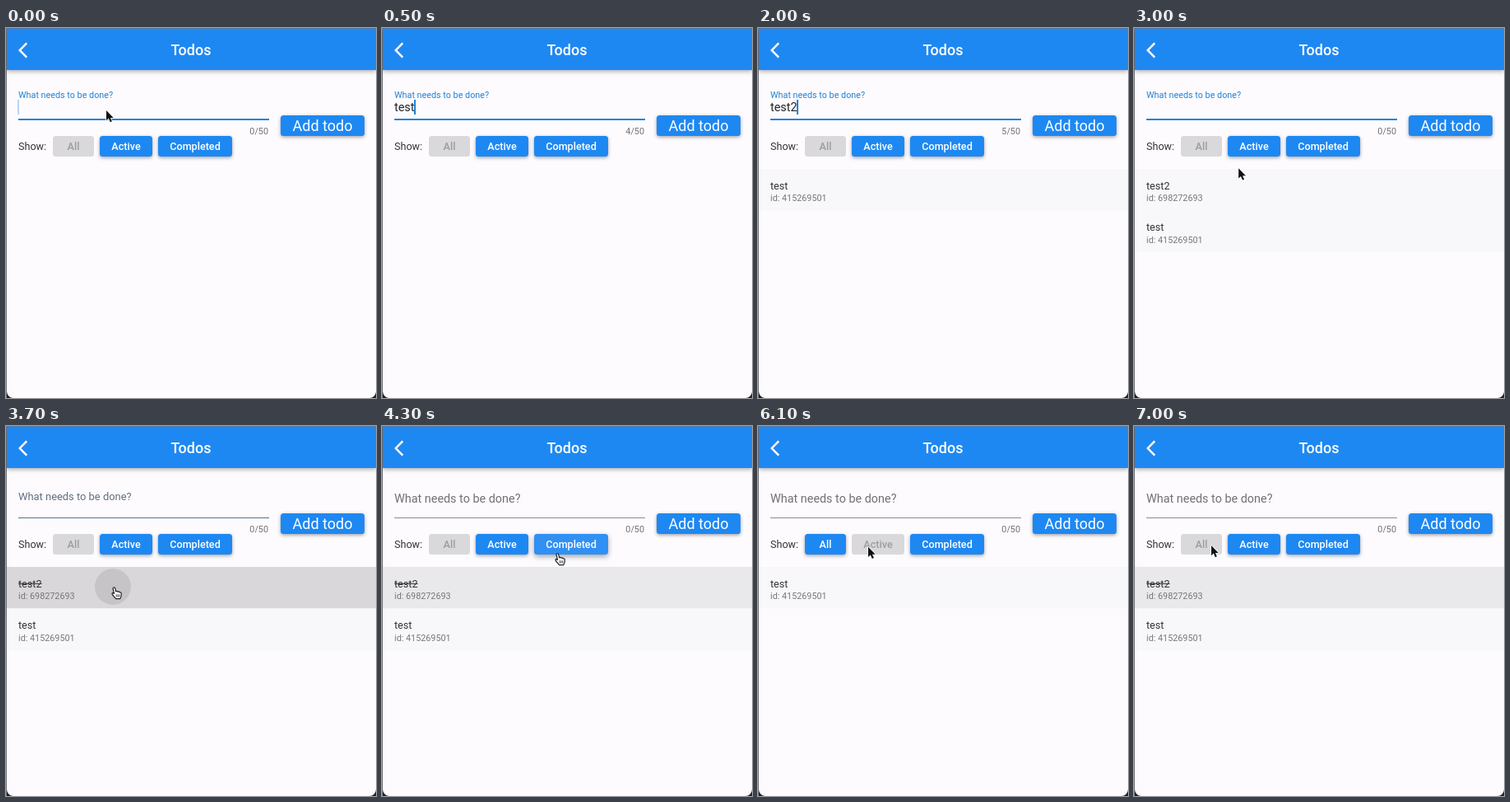
An HTML page with a canvas that plays this animation: 450x449 px, repeating every 7.1 s.

```html
<!DOCTYPE html>
<html lang="en">
<head>
<meta charset="utf-8">
<title>Todos</title>
<style>
html, body { margin: 0; width: 100%; height: 100%; overflow: hidden; background: #111; }
canvas { display: block; width: 450px; height: 449px; }
</style>
</head>
<body>
<canvas id="stage" width="450" height="449"></canvas>
<script>
const ctx = document.getElementById('stage').getContext('2d');
const LOOP = 7100, STEP = 100;
const BLUE = '#1e88f2', PAPER = '#fdfbfe';

const ARROW = new Path2D('M0 0V12.2L2.8 9.6L4.8 14.2L6.9 13.3L4.9 8.9H8.7Z');
const HAND = new Path2D('M1 2Q2.3 -.3 3.6 1.6L4.7 5.8Q6.2 4.9 7 6.2Q8.5 5.5 9.3 6.9Q10.9 6.5 11.3 8.4L11 11.6L9.8 14.6H4.6L.6 10Q-.8 7.6 1 7.3L2.5 8.4Z');
const KNUCKLES = new Path2D('M5.2 9.3V12.6M7 9.3V12.6M8.8 9.3V12.6');

const TODOS = {
  test: { title: 'test', id: 415269501 },
  test2: { title: 'test2', id: 698272693 },
};
const BUTTONS = [
  { label: 'All', x: 57, w: 50 },
  { label: 'Active', x: 114, w: 64 },
  { label: 'Completed', x: 185, w: 90 },
];

// [time, value]: each value holds until the next entry
const TYPED = [[0, ''], [200, 't'], [300, 'te'], [400, 'tes'], [500, 'test'], [800, ''],
  [1400, 't'], [1500, 'te'], [1700, 'tes'], [1800, 'test'], [1900, 'test2'], [2300, '']];
const FILTER = [[0, 'All'], [4700, 'Completed'], [5700, 'Active'], [6800, 'All']];
// [time, x, y]: the pointer glides between entries
const POINTER = [[0, 122, 100], [2600, 122, 100], [3200, 129, 195], [3800, 129, 195],
  [4200, 211, 154], [4800, 211, 154], [5200, 160, 148], [5800, 160, 148], [6500, 94, 145]];
const CLICKS = { row: 3500, Completed: 4500, Active: 5500, All: 6600 };

const clamp = v => Math.max(0, Math.min(1, v));
const lerp = (a, b, k) => a + (b - a) * k;
const ease = k => k * k * (3 - 2 * k);
const current = (track, t) => track.filter(e => e[0] <= t).pop();

function pointerAt(t) {
  const i = POINTER.findIndex(p => p[0] > t);
  if (i < 0) return POINTER[POINTER.length - 1].slice(1);
  const [t0, x0, y0] = POINTER[i - 1], [t1, x1, y1] = POINTER[i];
  const k = ease((t - t0) / (t1 - t0));
  return [lerp(x0, x1, k), lerp(y0, y1, k)];
}

function rect(x, y, w, h, color) {
  ctx.fillStyle = color;
  ctx.fillRect(x, y, w, h);
}

function text(str, x, y, size, color, align = 'left', weight = 400) {
  ctx.font = `${weight} ${size}px Roboto, sans-serif`;
  ctx.textAlign = align;
  ctx.fillStyle = color;
  ctx.fillText(str, x, y);
}

function withShadow(blur, dy, alpha, draw) {
  ctx.save();
  ctx.shadowColor = `rgba(0,0,0,${alpha})`;
  ctx.shadowBlur = blur;
  ctx.shadowOffsetY = dy;
  draw();
  ctx.restore();
}

function roundRect(x, y, w, h, r) {
  ctx.beginPath();
  ctx.roundRect(x, y, w, h, r);
}

function ripple(x, y, w, h, center, age, reach, rgb, alpha) {
  if (age <= 0 || age >= 500) return;
  ctx.save();
  roundRect(x, y, w, h, 3);
  ctx.clip();
  ctx.fillStyle = `rgba(${rgb},${alpha * clamp((600 - age) / 400)})`;
  ctx.beginPath();
  ctx.arc(...center, reach * (age / 200) ** 1.4, 0, 7);
  ctx.fill();
  ctx.restore();
}

function button(label, x, y, w, size, weight, disabled, hover) {
  const face = () => { roundRect(x, y, w, 25, 3.5); ctx.fill(); };
  ctx.fillStyle = disabled ? '#d9d8da' : hover ? '#3090f3' : BLUE;
  if (disabled) face();
  else withShadow(hover ? 6 : 4, hover ? 2.5 : 1.5, 0.36, face);
  text(label, x + w / 2, y + (size > 15 ? 19 : 17), size, disabled ? '#9d9c9f' : '#fff', 'center', weight);
}

function appBar() {
  withShadow(5, 2, 0.3, () => rect(1, 0, 449, 51, BLUE));
  rect(0, 0, 450, 1, '#56789c');
  ctx.strokeStyle = '#fff';
  ctx.lineWidth = 2.5;
  ctx.stroke(new Path2D('M25.2 18.4L16.8 27L25.2 35.6'));
  text('Todos', 225, 33, 18, '#fff', 'center', 500);
}

function inputField(t) {
  const [edited, typed] = current(TYPED, t);
  const rest = clamp((t - 3600) / 170);
  const focused = t <= 3600;
  const labelColor = focused ? '#1e82d8' : rest < 1 ? '#5f6f80' : '#717073';
  text('What needs to be done?', 15, lerp(85, 93, rest), lerp(10.8, 14.4, rest), labelColor);
  if (focused) rect(15, 110, 305, 2, '#1e82d8');
  else rect(15, 111, 305, 1, rest < 1 ? '#587188' : '#8d8b8e');
  text(typed, 15, 101, 14.4, '#222');
  if (focused && (t - edited) % 1000 < 500) {
    const x = 15 + ctx.measureText(typed).width;
    rect(typed ? x - 0.5 : 14.5, 87, t === 0 ? 1 : 2, 18, t === 0 ? '#79aee0' : '#1e82d8');
  }
  text(typed.length + '/50', 319, 129, 10.8, '#717073', 'right');
}

function visibleTodos(t, filter) {
  if (t < 800) return [];
  if (t < 2300) return [TODOS.test];
  if (filter === 'Completed') return [TODOS.test2];
  if (filter === 'Active') return [TODOS.test];
  return [TODOS.test2, TODOS.test];
}

function todoRow(todo, i, t, filter, hover) {
  const y = 171 + i * 50.5;
  const second = todo === TODOS.test2;
  const done = second && t >= 3600;
  const pressed = second && t >= 3500 && t < 4000;
  const focused = done && filter === 'All';
  rect(1, y, 449, 50.5, pressed ? '#d9d7da' : focused || hover ? '#e9e8ea' : '#f8f7f9');
  if (second) ripple(1, y, 449, 50, [130, 195], t - CLICKS.row, 22, '0,0,0', 0.09);
  text(todo.title, 15, y + 24.5, 12.6, '#333');
  if (done) rect(15, y + 20, ctx.measureText(todo.title).width, 1, '#333');
  text('id: ' + todo.id, 15, y + 39, 10.8, '#777679');
}

function drawPointer(x, y, hand) {
  ctx.save();
  ctx.translate(x, y);
  ctx.lineJoin = 'round';
  ctx.lineWidth = hand ? 1.2 : 1.6;
  ctx.strokeStyle = hand ? '#222' : '#fff';
  ctx.fillStyle = hand ? '#fff' : '#111';
  if (hand) {
    ctx.fill(HAND);
    ctx.stroke(HAND);
    ctx.lineWidth = 0.8;
    ctx.stroke(KNUCKLES);
  } else {
    ctx.stroke(ARROW);
    ctx.fill(ARROW);
  }
  ctx.restore();
}

function draw(t) {
  const filter = current(FILTER, t)[1];
  const shown = t < 200 || t >= 2600;
  const [px, py] = pointerAt(t);
  const inside = (x, y, w, h) => shown && px >= x && px < x + w && py >= y && py < y + h;
  let hand = false;

  rect(0, 0, 450, 449, '#222');
  rect(0, 0, 1, 449, '#77767a');
  ctx.fillStyle = PAPER;
  roundRect(1, 0, 449, 449, [0, 0, 8, 8]);
  ctx.fill();
  appBar();
  inputField(t);
  button('Add todo', 334, 106, 102, 18, 400, false, false);

  text('Show:', 15, 148, 12.6, '#333');
  for (const { label, x, w } of BUTTONS) {
    const disabled = label === filter;
    const hover = !disabled && inside(x, 131, w, 25);
    hand ||= hover;
    button(label, x, 131, w, 12.6, 500, disabled, hover);
    if (!disabled) ripple(x, 131, w, 25, [px, py], t - CLICKS[label], 28, '255,255,255', 0.2);
  }

  visibleTodos(t, filter).forEach((todo, i) => {
    const hover = inside(1, 171 + i * 50.5, 449, 50.5);
    hand ||= hover;
    todoRow(todo, i, t, filter, hover);
  });
  if (shown) drawPointer(px, py, hand);
}

function tick() {
  draw(Math.floor(performance.now() % LOOP / STEP) * STEP);
  requestAnimationFrame(tick);
}
tick();
</script>
</body>
</html>
```
